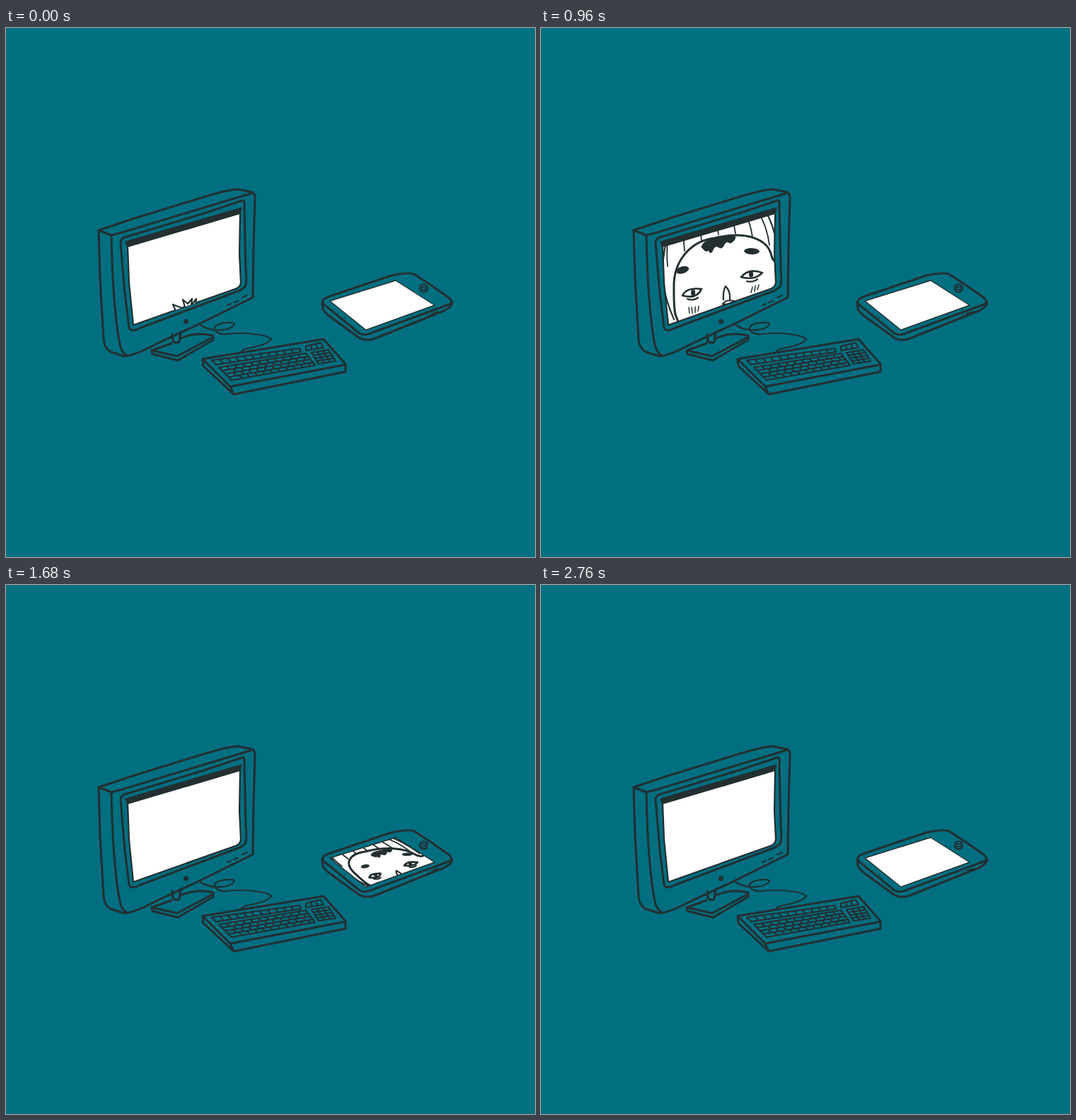
Animation, 748 px wide and 748 px high, one loop 2880 ms. Source, as an HTML page:

```html
<!DOCTYPE html>
<html lang="en">
<head>
<meta charset="utf-8">
<style>
  html, body { margin: 0; width: 100%; height: 100%; overflow: hidden; background: #006f80; }
  svg { display: block; width: 100%; height: 100%; }
  path, circle, ellipse { vector-effect: non-scaling-stroke; }
  .ink { fill: none; stroke: #232f30; stroke-width: 3; stroke-linecap: round; stroke-linejoin: round; }
  .thin { stroke-width: 2.2; }
  .solid { fill: #232f30; }
</style>
</head>
<body>
<svg viewBox="0 0 748 748">
  <defs>
    <path id="monitorScreen" d="M172 309L331 262L330 320L332 360Q331 367 324 369L180 420L174 360Z"/>
    <path id="tabletScreen" d="M458 386L551 357L606 392L509 427Z"/>
    <clipPath id="monitorClip"><use href="#monitorScreen"/></clipPath>
    <clipPath id="tabletClip"><use href="#tabletScreen"/></clipPath>

    <g id="hat" class="ink thin">
      <path d="M188 412Q172 375 172 345C172 268 220 225 250 225C310 228 328 262 336 320"/>
      <path id="stripes" stroke-width="1.8"/>
      <path stroke-width="3" d="M225 465C203 442 196 420 190 405C187 390 188 375 188 360C190 325 215 300 245 297C290 286 321 298 326 322Q328 332 337 330"/>
      <path fill="#fff" d="M254 222L236 215L242 228ZL250 208L257 214L263 207L262 216L269 207L268 218ZL272 216L285 224L268 230ZL242 240L250 242ZL264 242L270 238Z"/>
      <circle class="solid" cx="254" cy="222" r="3"/>
    </g>

    <g id="brows" class="ink solid" stroke-width="1">
      <path stroke-width="1" d="M227 309Q230 300 242 298Q258 293 275 295Q274 302 267 304Q262 300 259 306Q256 314 250 309Q245 307 242 316Q239 320 237 314Q232 318 227 309Z" fill="#232f30"/>
      <ellipse stroke-width="1" cx="298" cy="315.500" rx="10.500" ry="4" transform="rotate(2 298 315.500)" fill="#232f30"/>
      <ellipse stroke-width="1" cx="200" cy="342" rx="9" ry="4.500" transform="rotate(-16 200 342)" fill="#232f30"/>
    </g>

    <g id="face" class="ink thin">
      <path stroke-width="2.600" d="M200 378Q206 366 227 369Q220 384 200 378M283 352Q294 339 313 346Q303 357 283 352"/>
      <path d="M207 383Q216 386 222 381M291 358Q300 360 306 355"/>
      <ellipse class="solid" cx="215" cy="374" rx="2" ry="3"/>
      <ellipse class="solid" cx="297" cy="348" rx="2" ry="3"/>
      <path d="M258 384Q257 372 261 365Q268 372 267 384M257 390Q262 383 273 386Q275 393 266 396Q258 397 257 390Q265 392 272 388"/>
      <path stroke-width="1.500" d="M209 395l1 8M213 395l1 8M218 394v8M223 393l-1 7M299 366l-2 8M303 364l-1 8M308 363l-2 7"/>
    </g>
  </defs>

  <!-- monitor -->
  <g class="ink">
    <path d="M131 286L182 269L270 242Q310 229 328 228L347 232Q353 234 352 242L350 310L349 381L270 420L212 447Q180 464 167 464L148 458Q139 453 138 440L133 355Z"/>
    <path d="M131 286L149 293L161 290L270 257L346 234M149 293Q150 345 153 383Q157 430 161 447Q163 459 171 463"/>
    <path d="M174 424L168 375L162 304Q162 298 168 296L280 262L334 244Q338 243 337 251L339 340Q341 360 338 366L331 371L190 424Q177 431 174 424"/>
    <path class="solid" stroke-width="1" d="M169 302L333 254L331 263L172 310Z"/>
    <use href="#monitorScreen" fill="#fff" stroke-width="2.2"/>
    <path stroke-width="2" d="M313 392l5-2M322 388l6-2M334 381l7-3"/>
    <circle class="solid" stroke="none" cx="254.500" cy="415" r="3.500"/>
    <path d="M235 433L236 443Q240 447 245 444L247 430M206 456L234 446M247 439Q268 429 293 435L293 441L243 470L207 461L206 456L242 464L293 437"/>
    <path class="thin" d="M275 420Q285 427 300 427Q318 427 323 419Q322 415 309 417Q294 419 295 426Q298 433 310 433Q335 430 352 433Q371 435 375 440Q371 447 347 452Q333 454 332 459"/>
  </g>

  <!-- keyboard -->
  <g class="ink">
    <path d="M278 468L449 440L480 475L480 486L322 518L279 478ZL317 507L480 476M317 507L322 518"/>
    <path id="keys" class="thin"/>
  </g>

  <!-- tablet -->
  <g class="ink">
    <path d="M448 386Q448 383 456 380L500 365L545 350Q568 345 577 348L603 365L627 382Q633 388 626 391L520 430Q508 436 500 432L456 396Q447 390 448 386"/>
    <path d="M447 388L448 397Q450 402 458 408L498 437Q506 443 519 440L619 400Q631 394 631 388"/>
    <use href="#tabletScreen" fill="#fff" stroke-width="1.4"/>
    <circle class="thin" cx="590.500" cy="368" r="5.500"/>
    <path stroke-width="1.500" d="M588 366h5v4h-5zM478 409l1 1M596 406h1M601 404l10-3M602 406l6-2"/>
  </g>

  <g clip-path="url(#monitorClip)">
    <g id="monitorHead">
      <use href="#hat"/>
      <use href="#brows" id="monitorBrows"/>
      <use href="#face" id="monitorFace"/>
    </g>
  </g>
  <g clip-path="url(#tabletClip)">
    <g id="tabletHead">
      <use href="#hat" transform="translate(459 332) matrix(.744 -.074 .42 .39 0 0) translate(-250 -222)"/>
      <use href="#brows" transform="translate(531 387) matrix(.69 -.06 .3 .42 0 0) translate(-255 -361)"/>
      <use href="#face" transform="translate(526 387) matrix(.69 -.06 .3 .46 0 0) translate(-255 -361)"/>
    </g>
  </g>
</svg>
<script>
const $ = id => document.getElementById(id);
const LOOP = 2880, STEP = 40;

$('stripes').setAttribute('d', [-3, -2, -1, 0, 1, 2, 3].map(k =>
  `M${252 + k * 4} 230Q${243 + k * 24} 245 ${251 + k * 24} ${292 + 3.3 * k * k - 5 * k}`).join(''));

// Grid inside a quad with corners: top left, top right, bottom right, bottom left.
function grid([a, b, c, d], cols, rows, shift = 0) {
  const at = (u, v) => [0, 1].map(i =>
    ((a[i] * (1 - u) + b[i] * u) * (1 - v) + (d[i] * (1 - u) + c[i] * u) * v).toFixed(1)).join(' ');
  const line = (u, v, s, w) => `M${at(u, v)}L${at(s, w)}`;
  let path = line(0, 0, 0, 1) + line(1, 0, 1, 1);
  for (let r = 0; r <= rows; r++) path += line(0, r / rows, 1, r / rows);
  for (let r = 0; r < rows; r++)
    for (let k = 1; k < cols; k++) {
      const u = (k + (r % 2) * shift) / cols;
      path += line(u, r / rows, u, (r + 1) / rows);
    }
  return path;
}

$('keys').setAttribute('d',
  grid([[291, 470], [415, 453], [417, 458], [297, 476]], 11, 1) +
  grid([[301, 480], [424, 460], [437, 477], [319, 498]], 11, 4, 0.4) +
  grid([[432, 459], [456, 455], [466, 471], [442, 475]], 3, 4) +
  grid([[424, 450], [445, 445], [449, 452], [424, 456]], 3, 1));

const ease = u => u < 0.5 ? 4 * u ** 3 : 1 - 4 * (1 - u) ** 3;
const clamp = u => Math.max(0, Math.min(1, u));

// Distance below the resting pose: 1 is hidden, 0 is fully risen.
const sunk = (t, rise, fall, span) =>
  1 - ease(clamp((t - rise) / span)) + ease(clamp((t - fall) / span));

const move = (id, x, y) => $(id).setAttribute('transform', `translate(${x} ${y})`);
const show = (id, on) => $(id).setAttribute('display', on ? 'inline' : 'none');

function draw(now) {
  const t = Math.floor(now % LOOP / STEP) * STEP;

  // The features lag behind the hat a little, as if the head tilts.
  const drop = 215 * sunk(t, 0, 760, 560) - 39;
  move('monitorHead', 0, drop);
  move('monitorBrows', 0.2 * drop, 0);
  move('monitorFace', 0.15 * drop, -0.2 * drop);
  show('monitorHead', t < 1360);

  const slide = sunk(t, 1360, 2240, 520);
  move('tabletHead', 90 * slide, 68 * slide);
  show('tabletHead', t >= 1360 && t < 2760);
}

const start = performance.now();
(function tick() {
  draw(performance.now() - start);
  requestAnimationFrame(tick);
})();
</script>
</body>
</html>
```
